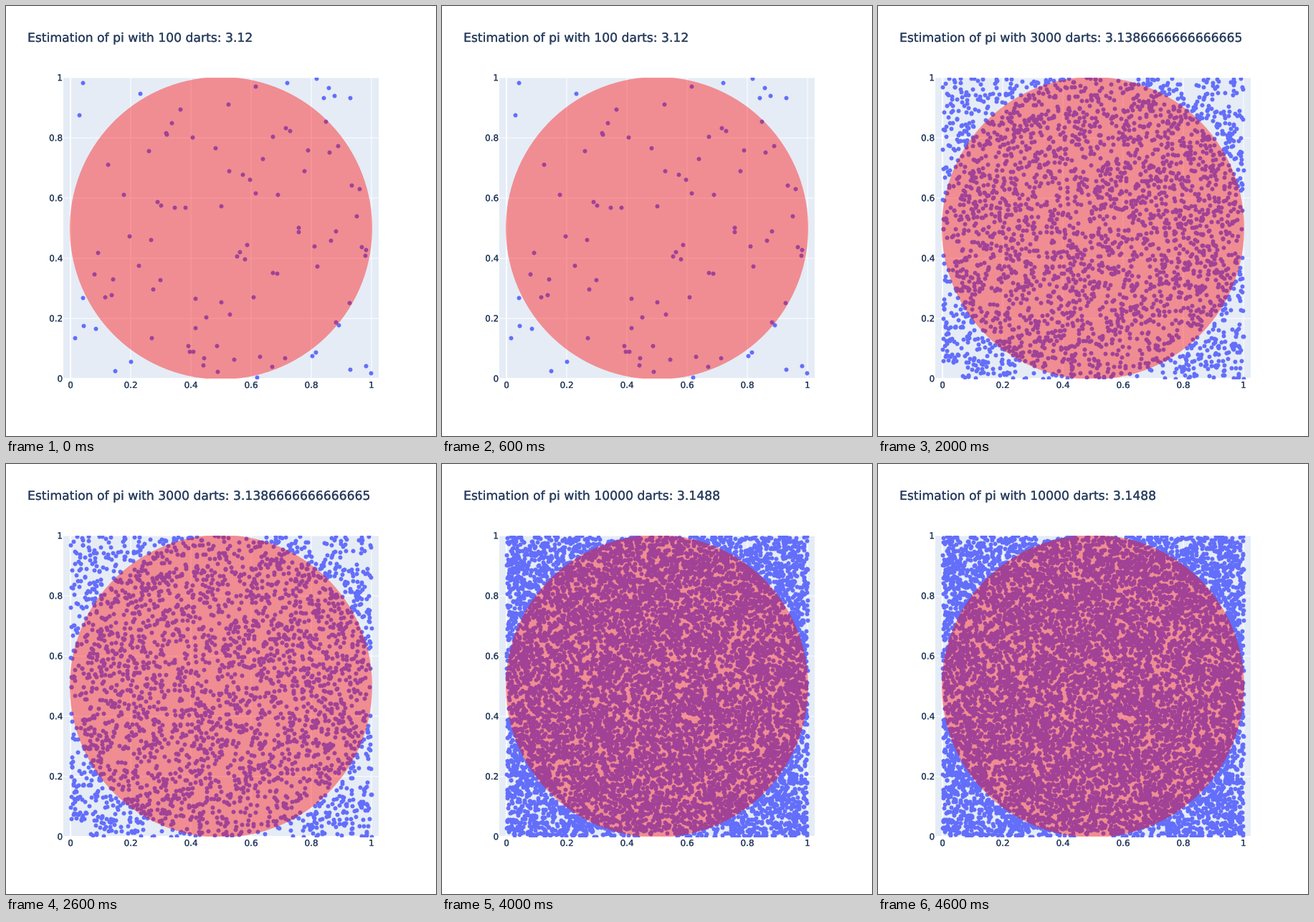
A matplotlib script for the animation above (5 s loop, 600x600 px).

```python
import matplotlib.pyplot as plt
import numpy as np
from matplotlib.animation import FuncAnimation
from matplotlib.patches import Circle, Rectangle
from matplotlib.patheffects import withStroke

SIZE, DPI = 600, 100
PX = 72 / DPI                              # points per pixel
LEFT, TOP, RIGHT, BOTTOM = 80, 100, 520, 520
X0, SIDE = 90, 420                         # unit square in pixels
INK, PANEL, DOT = "#2a3f5f", "#E5ECF6", "#636efa"

# (darts thrown, darts inside the circle)
ROUNDS = [(100, 78), (1000, 780), (3000, 2354), (8000, 6265), (10000, 7872)]


def throw(total, hits, seed):
    """Random darts in pixels with exactly the given number of hits."""
    rng = np.random.default_rng(seed)
    darts = rng.random((4 * total, 2))
    inside = np.hypot(*(darts - 0.5).T) < 0.5
    chosen = np.vstack([darts[inside][:hits], darts[~inside][:total - hits]])
    return chosen * SIDE + (X0, TOP)


fig = plt.figure(figsize=(SIZE / DPI, SIZE / DPI), dpi=DPI, facecolor="white")
ax = fig.add_axes([0, 0, 1, 1])
ax.set(xlim=(0, SIZE), ylim=(SIZE, 0))
ax.axis("off")


def label(x, y, text, size, ha):
    # a hairline outline gives the letters a slightly heavier stroke
    return ax.text(x, y, text, fontsize=size * PX, color=INK, ha=ha,
                   va="baseline", family="DejaVu Sans",
                   path_effects=[withStroke(linewidth=0.25 * PX,
                                            foreground=INK)])


panel = ax.add_patch(Rectangle((LEFT, TOP), RIGHT - LEFT, BOTTOM - TOP,
                               fc=PANEL, lw=0, zorder=0))

for k in range(6):
    x, y = X0 + SIDE * k / 5, BOTTOM - SIDE * k / 5
    style = dict(color="white", lw=(1 if k else 2) * PX, zorder=1,
                 solid_capstyle="butt", snap=False)
    ax.plot([x, x], [TOP, BOTTOM], **style)
    ax.plot([LEFT, RIGHT], [y, y], **style)
    tick = f"{k / 5:g}"
    label(x, 533, tick, 12, "center")
    label(LEFT - 1, y + 4.2, tick, 12, "right")

dots, = ax.plot([], [], "o", color=DOT, ms=6 * PX, mew=0, zorder=2)
disc = ax.add_patch(Circle((X0 + SIDE / 2, TOP + SIDE / 2), SIDE / 2 + 1,
                           fc="red", alpha=0.4, lw=0, zorder=3))
for art in (dots, disc):
    art.set_clip_path(panel)

title = label(30, 50, "", 17.2, "left")
clouds = [throw(n, hits, seed) for seed, (n, hits) in enumerate(ROUNDS)]


def draw(i):
    total, hits = ROUNDS[i]
    dots.set_data(*clouds[i].T)
    title.set_text(f"Estimation of pi with {total} darts: {4 * hits / total}")
    return dots, title


anim = FuncAnimation(fig, draw, frames=len(ROUNDS), interval=1000,
                     repeat=True, repeat_delay=0)
plt.show()
```
